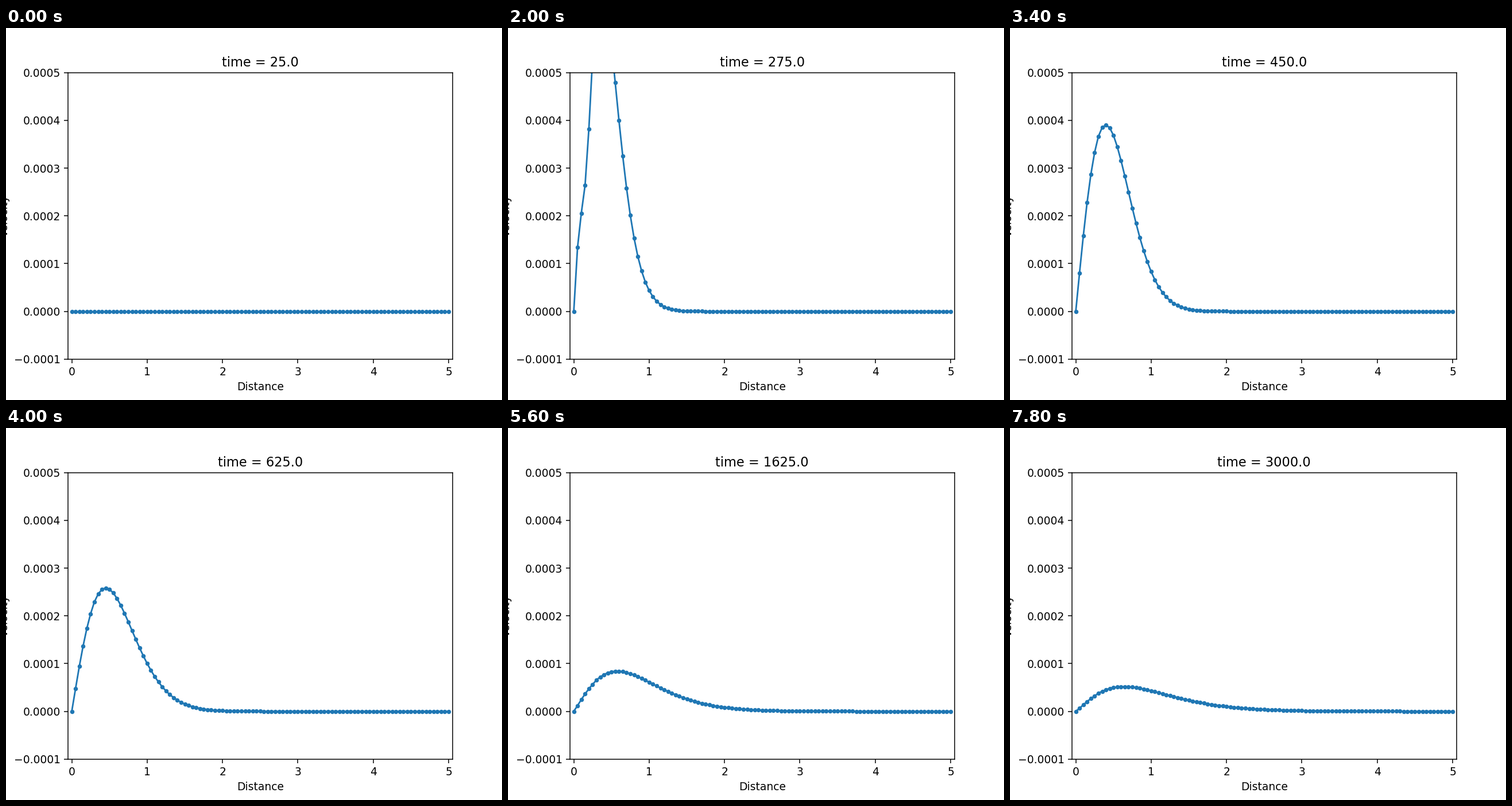
These frames come from a looping animation (864 px wide and 648 px high, 8000 ms). A matplotlib script:

```python
import numpy as np
import matplotlib.pyplot as plt
from matplotlib.animation import FuncAnimation

FRAMES, STEP_MS = 40, 200
ONSET = 25.0      # time at which the pulse starts
FIRST = 175.0     # before this the profile spreads self-similarly

# v = amp * x * exp(-x^2 / (s + k x)) - dip(x), in units of 1e-4
KEYS = np.log([175, 275, 450, 1125, 2125, 3000])
AMP = np.log([188, 41, 16.45, 3.86, 1.98, 1.5])
S = [0.043, 0.165, 0.288, 0.41, 0.40, 0.42]
K = [0.10, 0.055, 0.047, 0.215, 0.33, 0.38]

# boundary dip at the first nodes, fading with time
DIP_X = [0, 0.05, 0.10, 0.15, 0.20, 0.25, 0.30]
DIP_KEYS = KEYS[:3]
DIPS = np.log([[20, 35, 27.5, 13.7, 3.0],
               [0.68, 1.81, 2.76, 2.72, 1.91],
               [0.01, 0.01, 0.01, 0.01, 0.01]])

x = np.linspace(0, 5, 101)


def time_at(i):
    return 25.0 * (i + 1) if i < 20 else 500.0 + 125.0 * (i - 19)


def profile(pos, t):
    lt = np.log(t)
    amp = np.exp(np.interp(lt, KEYS, AMP))
    s, k = np.interp(lt, KEYS, S), np.interp(lt, KEYS, K)
    dip = [np.exp(np.interp(lt, DIP_KEYS, col)) for col in DIPS.T]
    v = amp * pos * np.exp(-pos**2 / (s + k * pos))
    return 1e-4 * (v - np.interp(pos, DIP_X, [0, *dip, 0]))


def velocity(t):
    if t <= ONSET:
        return np.zeros_like(x)
    if t < FIRST:
        spread = np.sqrt((t - ONSET) / (FIRST - ONSET))
        return profile(x / spread, FIRST) / spread
    return profile(x, t)


fig, ax = plt.subplots(figsize=(6.4, 4.8), dpi=135)
line, = ax.plot(x, np.zeros_like(x), marker=".")
ax.set_xlim(-0.05, 5.05)
ax.set_xlabel("Distance")
ax.set_ylabel("Velocity")
ax.set_ylim(-0.0001, 0.0005)
title = ax.set_title("time = 25.0")


def update(i):
    t = time_at(i)
    line.set_ydata(velocity(t))
    title.set_text(f"time = {t}")
    return line, title


anim = FuncAnimation(fig, update, frames=FRAMES, interval=STEP_MS,
                     repeat=True, repeat_delay=0)
plt.show()
```
